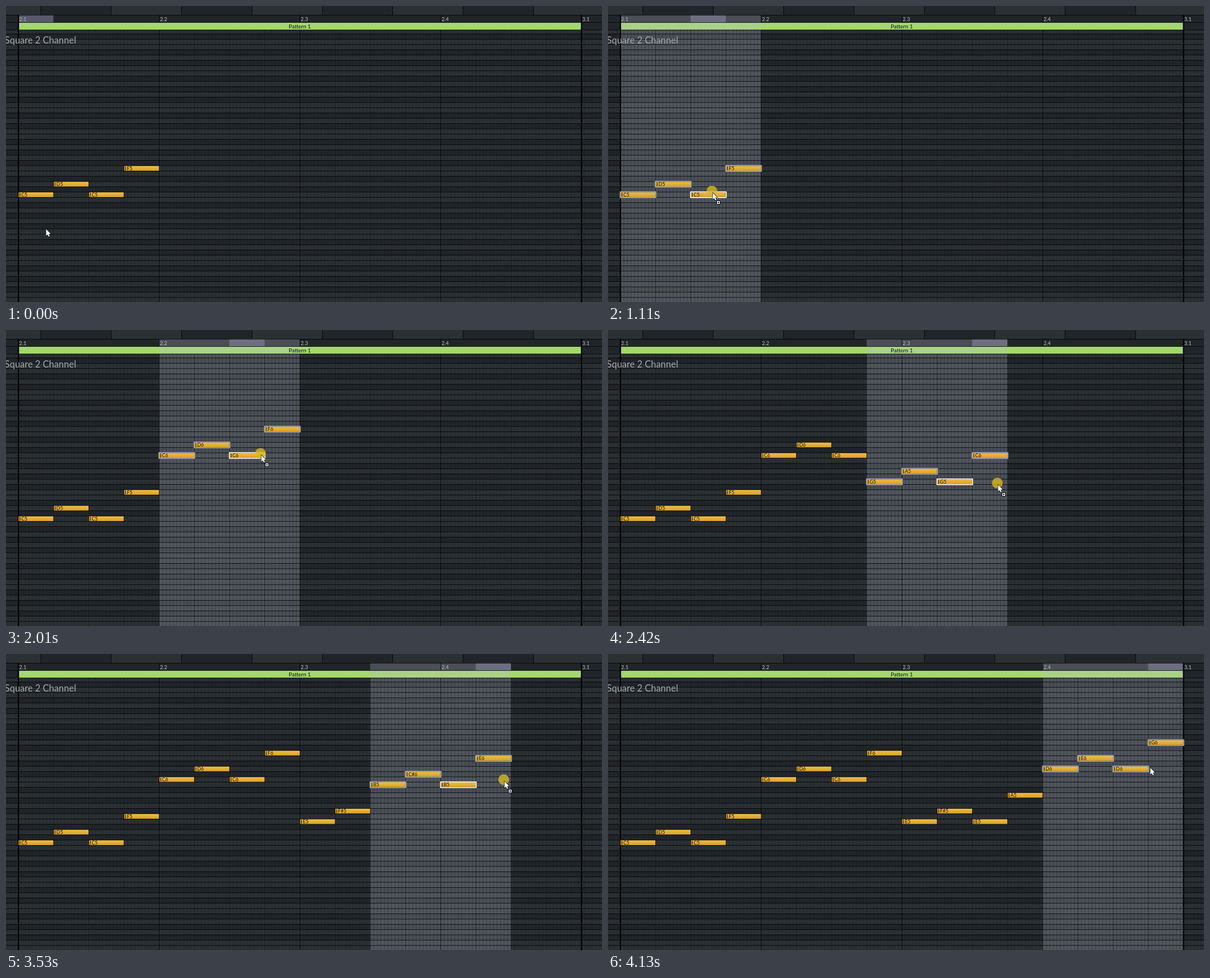
An HTML page with a canvas for the animation above (4.23 s loop, 1061 by 528 pixels).

```html
<!DOCTYPE html>
<html lang="en">
<head>
<meta charset="utf-8">
<style>
html, body { margin: 0; width: 100%; height: 100%; overflow: hidden; background: #212529; }
canvas { display: block; }
</style>
</head>
<body>
<canvas id="stage" width="1061" height="528"></canvas>
<script>
// The editor is laid out in whole units and shown slightly reduced
const SCALE = 0.7832, OFFSET_X = 0.55, OFFSET_Y = 0.23;
const W = 1356, H = 676, LOOP = 4230;
const LEFT = 27, CELL = 80, ROW = 12, C5_TOP = 423;
const RULER_Y = 20, BAR_Y = 37, GRID_TOP = 54;
const DARK = '#212529', LIGHT = '#2b3033', LINE = '#191c1f';
const ctx = document.getElementById('stage').getContext('2d');

const MOTIF = [0, 2, 0, 5];
const NAMES = ['C', 'C#', 'D', 'D#', 'E', 'F', 'F#', 'G', 'G#', 'A', 'A#', 'B'];

// Copies left behind: release time, first cell, semitones above C5
const PLACED = [
  { at: 0, cell: 0, semi: 0 },
  { at: 2120, cell: 4, semi: 12 },
  { at: 2920, cell: 8, semi: 4 }
];

// time, mode, pointer x, y in pixels, then selected count or (first cell, semitones)
const STEPS = [
  [0, 'arrow', 71, 397, 0],
  [100, 'select', 73, 396, 1],
  [200, 'select', 98, 390, 2],
  [300, 'select', 140, 384, 2],
  [400, 'select', 186, 378, 3],
  [500, 'select', 218, 375, 4],
  [600, 'arrow', 226, 374, 4],
  [700, 'arrow', 204, 352],
  [800, 'move', 184, 334],
  [1110, 'drag', 186, 332],
  [1210, 'drag', 215, 322],
  [1310, 'drag', 330, 295, 2, 4],
  [1410, 'drag', 445, 261, 4, 7],
  [1510, 'drag', 456, 247, 4, 9],
  [1610, 'drag', 455, 240, 4, 10],
  [1810, 'drag', 455, 234],
  [1910, 'drag', 454, 228, 4, 11],
  [2010, 'drag', 454, 222, 4, 12],
  [2120, 'drag', 454, 219],
  [2220, 'move', 452, 222],
  [2320, 'drag', 454, 219],
  [2420, 'drag', 694, 275, 7, 7],
  [2520, 'drag', 704, 290, 8, 5],
  [2620, 'drag', 697, 296, 8, 4],
  [2720, 'drag', 692, 298],
  [2920, 'drag', 691, 297],
  [3020, 'move', 691, 296],
  [3120, 'drag', 693, 295],
  [3220, 'drag', 705, 290],
  [3330, 'drag', 750, 275, 9, 6],
  [3430, 'drag', 820, 252, 9, 8],
  [3530, 'drag', 887, 226, 10, 11],
  [3630, 'drag', 940, 210, 11, 13],
  [3730, 'drag', 962, 204, 12, 14],
  [3830, 'drag', 967, 203],
  [4130, 'arrow', 965, 202]
];

function buildStates() {
  let count = 0, cell = 0, semi = 0;
  return STEPS.map(([time, mode, x, y, a, b]) => {
    if (b !== undefined) [cell, semi] = [a, b];
    else if (a !== undefined) count = a;
    return { time, mode, x, y, count, cell, semi };
  });
}
const states = buildStates();

const cellX = i => LEFT + i * CELL;
const rowY = semi => C5_TOP - semi * ROW;

function rect(x, y, w, h, color) {
  ctx.fillStyle = color;
  ctx.fillRect(x, y, w, h);
}

function text(str, x, y, size, color, align = 'left') {
  ctx.font = `${size}px Lato, "Open Sans", sans-serif`;
  ctx.textAlign = align;
  ctx.fillStyle = color;
  ctx.fillText(str, x, y);
}

function polygon(points) {
  ctx.beginPath();
  points.forEach(([x, y]) => ctx.lineTo(x, y));
  ctx.closePath();
}

function disc(x, y, r, color) {
  ctx.fillStyle = color;
  ctx.beginPath();
  ctx.arc(x, y, r, 0, 7);
  ctx.fill();
}

function drawRows() {
  rect(-1, -1, W, H, LIGHT);
  for (let semi = -21; semi <= 31; semi++) {
    if (NAMES[(semi + 24) % 12].includes('#')) rect(-1, rowY(semi), W, ROW, DARK);
  }
}

function drawGrid() {
  ctx.strokeStyle = LINE;
  ctx.lineWidth = 1;
  ctx.setLineDash([2, 2]);
  ctx.beginPath();
  for (let x = LEFT - 24; x < W; x += CELL / 10) {
    if ((x - LEFT) % CELL === 0) continue;
    ctx.moveTo(x + 0.5, GRID_TOP);
    ctx.lineTo(x + 0.5, H);
  }
  ctx.stroke();
  ctx.setLineDash([]);
  for (let i = 1; i < 16; i++) rect(cellX(i), GRID_TOP, 1, H, i % 4 ? LINE : '#000');
  for (let semi = -21; semi <= 30; semi++) rect(-1, rowY(semi), W, 1, '#000');
}

function drawHeader(state) {
  rect(-1, -1, W, GRID_TOP + 1, DARK);
  for (let i = -1; i < 8; i++) {
    const x = 78 + i * 2 * CELL;
    if (i % 2) rect(x, -1, 2 * CELL, RULER_Y + 1, LIGHT);
    rect(x, -1, 1, RULER_Y + 1, '#000');
  }
  rect(LEFT, BAR_Y, 16 * CELL, GRID_TOP - BAR_Y, '#a3d86d');
  if (state.count) drawSelection(state, RULER_Y, GRID_TOP - RULER_Y);
  const hover = Math.floor((state.x / SCALE - LEFT) / CELL);
  rect(cellX(hover), RULER_Y, CELL, BAR_Y - RULER_Y, 'rgba(142,143,176,.5)');
  [RULER_Y, BAR_Y, GRID_TOP].forEach(y => rect(-1, y, W, 1, '#000'));
  for (let i = 4; i < 16; i += 4) rect(cellX(i), RULER_Y, 1, BAR_Y - RULER_Y, '#000');
  for (const i of [0, 16]) rect(cellX(i) - 1, RULER_Y, 3, H, '#000');
  ['2.1', '2.2', '2.3', '2.4', '3.1'].forEach((label, i) =>
    text(label, cellX(i * 4) + 2, 34, 12, '#babdc0'));
  text('Pattern 1', cellX(8), 51, 12.5, '#111', 'center');
}

function drawSelection({ cell, count }, y, h) {
  rect(cellX(cell), y, count * CELL, h, 'rgba(186,190,205,.27)');
}

function drawNote(cell, semi, outline) {
  const x = cellX(cell), y = rowY(semi);
  const fill = ctx.createLinearGradient(0, y, 0, y + ROW);
  fill.addColorStop(0, '#f3c044');
  fill.addColorStop(1, '#d6a02c');
  rect(x, y, CELL + 1, ROW + 1, '#000');
  rect(x + 1, y + 1, CELL - 1, ROW - 1, fill);
  rect(x + 3, y + 2, 2, ROW - 3, 'rgba(20,15,0,.7)');
  if (outline) {
    ctx.strokeStyle = outline;
    ctx.lineWidth = 2;
    ctx.strokeRect(x, y, CELL + 1, ROW + 1);
  }
  text(NAMES[semi % 12] + (5 + Math.floor(semi / 12)), x + 7, y + 10.5, 11, '#15120a');
}

function drawNotes({ time, mode, count, cell, semi }) {
  for (const block of PLACED) {
    if (block.at > time) continue;
    MOTIF.forEach((step, i) => {
      const at = block.cell + i;
      const covered = at >= cell && at < cell + count;
      if (!covered) drawNote(at, block.semi + step);
    });
  }
  const grabbed = mode === 'move' || mode === 'drag' ? 2 : -1;
  for (let i = 0; i < count; i++) {
    if (i !== grabbed) drawNote(cell + i, semi + MOTIF[i], '#a9adb5');
  }
  if (grabbed > 0) drawNote(cell + grabbed, semi + MOTIF[grabbed], '#fff');
}

function outlineFill() {
  ctx.lineJoin = 'round';
  ctx.lineWidth = 1.4;
  ctx.strokeStyle = '#111';
  ctx.stroke();
  ctx.fillStyle = '#fff';
  ctx.fill();
}

function drawMoveCursor() {
  const points = [];
  for (let i = 0; i < 4; i++) {
    const c = [1, 0, -1, 0][i], s = [0, 1, 0, -1][i];
    [[-1, -1], [-1, -5], [-3, -5], [0, -8.5], [3, -5], [1, -5]].forEach(([x, y]) =>
      points.push([x * c - y * s, x * s + y * c]));
  }
  polygon(points);
  outlineFill();
}

function drawPointer({ mode, x, y }) {
  ctx.save();
  ctx.setTransform(1, 0, 0, 1, x, y);
  if (mode === 'drag') disc(-1, -2, 9.5, 'rgba(218,186,28,.78)');
  if (mode === 'select') disc(-1, -2, 9.5, 'rgba(190,50,50,.7)');
  if (mode === 'move') {
    drawMoveCursor();
  } else {
    polygon([[0.5, 1], [0.5, 13], [3, 10.6], [5, 14.5], [6.8, 13.6], [5, 9.7], [8.5, 9.4]]);
    outlineFill();
  }
  if (mode === 'drag') {
    rect(7, 15, 7, 7, '#111');
    rect(8, 16, 5, 5, '#fff');
    rect(10, 17, 1, 3, '#111');
    rect(9, 18, 3, 1, '#111');
  }
  ctx.restore();
}

function draw(state) {
  ctx.setTransform(SCALE, 0, 0, SCALE, OFFSET_X, OFFSET_Y);
  drawRows();
  if (state.count) drawSelection(state, GRID_TOP, H);
  drawGrid();
  drawHeader(state);
  drawNotes(state);
  text('Square 2 Channel', -3.5, 85, 21, '#a3a6a9');
  drawPointer(state);
}

let shown;
function tick() {
  const time = performance.now() % LOOP;
  const state = states.findLast(s => s.time <= time);
  if (state !== shown) draw(shown = state);
  requestAnimationFrame(tick);
}
tick();
</script>
</body>
</html>
```
